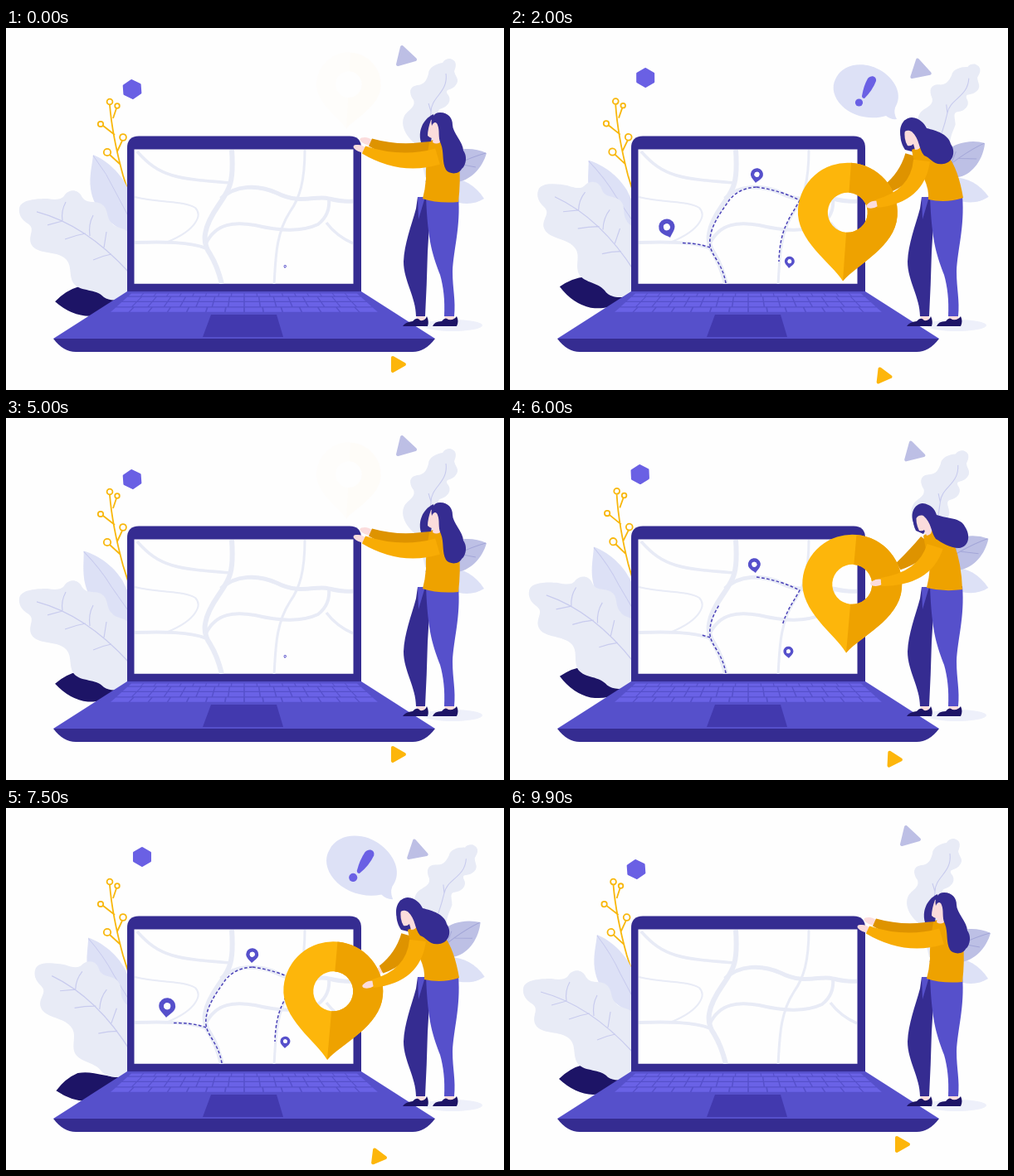
These frames come from a looping animation (600 by 437 pixels, 10000 ms). An HTML page with a canvas:

```html
<!DOCTYPE html>
<html lang="en">
<head>
<meta charset="utf-8">
<title>Placing a pin on a laptop map</title>
<style>
html, body { margin: 0; width: 600px; height: 437px; overflow: hidden; background: #fefefe }
canvas { display: block }
</style>
</head>
<body>
<canvas id="stage" width="600" height="437"></canvas>
<script>
const g = document.getElementById('stage').getContext('2d');
const NAVY = '#352c91', INK = '#1d1466', BLUE = '#5650cb', KEY = '#6a62e6', ROUTE = '#4a41b8',
  PALE = '#e8ebf6', LILAC = '#dde1f6', VEIN = '#c8cbee', GOLD = '#fdb60b', AMBER = '#eea200', SKIN = '#fbdcdc';

const fill = (d, color, rule) => { g.fillStyle = color; g.fill(new Path2D(d), rule); };
const line = (d, color, width) => {
  g.strokeStyle = color; g.lineWidth = width; g.stroke(new Path2D(d));
};
const disc = (x, y, r, color) => {
  g.fillStyle = color; g.beginPath(); g.arc(x, y, r, 0, 7); g.fill();
};
// Draws around the point (x, y), turned and scaled there.
const at = (x, y, deg, scale, draw) => {
  g.save(); g.translate(x, y); g.rotate(deg * Math.PI / 180); g.scale(scale, scale);
  draw(); g.restore();
};
const spin = (x, y, deg, draw, scale = 1) =>
  at(x, y, deg, scale, () => { g.translate(-x, -y); draw(); });

// Interpolates every number in two strings of the same form.
const NUM = /-?[\d.]+/g;
const mix = (a, b, k) => {
  const to = b.match(NUM);
  let i = 0;
  return a.replace(NUM, v => (+v + (to[i++] - v) * k).toFixed(3));
};
const track = (keys, t) => {
  const i = keys.findIndex(k => k[0] > t);
  if (i < 0) return keys[keys.length - 1][1];
  if (!i) return keys[0][1];
  const [t0, a] = keys[i - 1], [t1, b] = keys[i], u = (t - t0) / (t1 - t0);
  return mix(a, b, u * u * (3 - 2 * u));
};
const nums = (keys, t) => track(keys, t).split(' ').map(Number);

const ROADS = [
  ['M272 147C275 190 268 196 256 214C238 240 235 258 246 273Q255 288 260 309', 6],
  ['M158 149C185 180 205 182 271 187', 3.5],
  ['M155 204C190 212 213 208 228 217C237 226 229 244 195 258', 2],
  ['M155 259C190 258 222 258 241 266', 4],
  ['M259 206C276 189 304 189 326 199C355 214 375 201 389 206Q405 210 418 209', 5],
  ['M241 260C253 235 276 234 300 238C333 246 357 246 376 237Q391 225 389 206', 4],
  ['M360 147C360 185 354 205 342 222C324 250 325 282 323 309', 3],
  ['M386 235Q398 251 418 260', 3.5]
];
const TRUNK = 'M260 308C256 284 243 276 241 262C239 242 253 224 264 208Q276 193 297 192',
  WEST = 'M241 265Q222 258 193 260', EAST = 'M297 192Q326 196 349 208C337 230 325 242 324 282';

const POSE_TIMES = [0, .25, 1, 2, 2.5, 3.3, 4.1, 4.85];
const POSE_ORDER = [0, 0, 1, 2, 2, 3, 3, 0];
const posed = list => POSE_TIMES.map((t, i) => [t, list[POSE_ORDER[i]]]);
const HAIR = posed([
  'M513 118C511 108 516 102 523 102C533 102 538 109 538 117C538 126 551 138 551 148C557 156 553 168 549 170C546 177 534 177 530 171C525 162 528 150 524 140C520 132 523 124 520 117C518 112 515 114 513 118Z',
  'M486 126C482 115 487 104 497 103C507 104 512 110 514 117C528 122 543 120 548 131C556 143 552 156 541 157C529 157 520 150 513 146C507 138 508 126 498 118C491 116 489 122 486 126Z',
  'M471 131C468 120 473 109 484 108C494 109 499 115 502 121C514 124 528 128 531 140C538 150 533 163 522 164C510 166 506 156 499 154C492 146 494 134 484 125C476 121 474 127 471 131Z',
  'M469 132C466 121 470 110 481 109C491 110 496 116 499 122C511 125 525 130 528 141C534 150 531 164 522 166C511 168 506 159 498 156C490 150 491 136 481 126C474 123 472 128 469 132Z'
]);
const BACK_HAIR = posed([
  'M515 104C502 110 496 125 500 138L512 137L515 120Z', 'M490 107C484 114 484 126 489 136L498 140L505 128Z',
  'M476 111C469 119 468 136 476 147L488 150L492 136Z', 'M474 112C466 120 465 138 474 150L486 153L490 138Z'
]);
const FACE = posed([
  'M512 111Q508 122 508 130Q512 134 515 133L514 138Q520 142 525 136L523 108Z',
  'M490 116Q488 126 493 136Q497 137 499 135L502 142Q508 141 508 136L503 112Z',
  'M476 122Q474 134 479 142Q483 143 486 140L488 147Q494 147 495 142L490 118Z',
  'M474 124Q472 135 477 143Q481 144 484 141L486 149Q492 149 493 144L488 119Z'
]);
const TORSO = posed([
  'M510 138Q505 165 506 182Q505 195 502 206Q520 212 545 210Q548 185 546 165Q540 140 522 135Z',
  'M498 142Q502 165 506 180Q505 193 502 205Q522 210 545 207Q544 175 535 152Q520 138 508 136Z',
  'M484 147Q486 165 499 182Q505 195 504 207Q525 212 546 205Q540 170 528 155Q510 142 494 143Z',
  'M482 148Q485 170 498 190Q504 198 504 207Q525 212 546 204Q538 170 525 155Q505 143 491 144Z'
]);
// Arms: wrist, elbow, shoulder.
const FAR_ARM = posed([
  '439 138 478 155 517 145', '468 179 490 166 503 149', '452 195 478 182 486 154', '443 217 482 201 486 152'
]);
const NEAR_ARM = posed([
  '431 147 476 168 520 155', '447 198 500 194 512 155',
  '442 212 491 203 496 160', '463 231 494 207 495 160'
]);
// Big pin: tip, turn, scale, opacity.
const BIG_PIN = [
  [0, '410 122 3 .65 0.01'], [.35, '409 165 4 .9 1'], [1, '405 283.5 5 1 1'], [2, '401 305.5 4 1 1'],
  [2.5, '387 304 5 1 1'], [3.1, '380 302 4 .95 0']
];
// Map pins: x, y, size, then scale and turn over time.
const MAP_PINS = [
  [193, 253, 1 / 6, [[1.1, '0 0'], [1.7, '1 -24'], [2, '.97 -18'], [2.5, '1 5'], [3.2, '1 0'], [4.4, '1 0'], [4.8, '0 0']]],
  [296, 187, .125, [[.2, '0 0'], [.8, '1.05 -14'], [1, '1 -9'], [2, '1 8'], [3, '1 0'], [4.4, '1 0'], [4.8, '0 0']]],
  [336, 290, .1, [[0, '.28 5'], [.6, '1.1 10'], [1, '1 -4'], [2, '1 6'], [3, '1 0'], [4.3, '1 0'], [4.8, '0 0']]]
];
const BUBBLE = [
  [1, '0 -30'], [1.6, '.9 -4'], [2, '1 0'], [2.5, '1.1 5'], [3.5, '1.03 10'], [4.1, '1 6'], [4.7, '0 -25']
];
const REACH = [[0, '0 0 0'], [1, '92 12 102'], [2, '165 38 165'], [2.5, '165 44 165'], [3.2, '165 60 165']];

function pin(left, right) {
  const hole = 'M24 -83A24 24 0 1 0 -24 -83A24 24 0 1 0 24 -83Z';
  const body = 'M0 0C-15 -21 -60 -45 -60 -83A60 60 0 0 1 60 -83C60 -45 15 -21 0 0Z';
  fill(body + hole, left, 'evenodd');
  if (right) fill('M0 0V-59A24 24 0 0 0 0 -107V-143A60 60 0 0 1 60 -83C60 -45 15 -21 0 0Z', right);
  else fill(hole, '#fefefe');
}

function arm([wx, wy, ex, ey, sx, sy], color) {
  const dir = Math.atan2(wy - ey, wx - ex), up = Math.atan2(ey - sy, ex - sx);
  const side = (x, y, a, r) => `${x - Math.sin(a) * r} ${y + Math.cos(a) * r}`;
  const mid = (dir + up) / 2 + (Math.abs(dir - up) > Math.PI ? Math.PI : 0);
  at(wx, wy, dir * 180 / Math.PI, 1, () =>
    fill('M-2 -3Q6 -6 12 -3Q15 0 10 2Q5 5 -2 3Z', SKIN));
  fill(`M${side(wx, wy, dir, 5)}Q${side(ex, ey, mid, 11)} ${side(sx, sy, up, 10)}` +
    `L${side(sx, sy, up, -10)}Q${side(ex, ey, mid, -11)} ${side(wx, wy, dir, -5)}Z`, color);
}

function route(d, length) {
  const dashes = Array(Math.floor(length / 6)).fill([3.6, 2.4]).flat();
  if (!dashes.length) return;
  g.setLineDash([...dashes, 0, 999]);
  line(d, ROUTE, 1.5);
  g.setLineDash([]);
}

function plants(t, sway) {
  const a = 2 * Math.PI * t * .3, s = Math.sin(a), c = Math.cos(a);
  spin(150, 325, 1 - 10 * s - 3 * c, () =>
    fill('M150 325C120 322 110 310 88 310Q72 314 59 327Q78 345 100 346C125 345 130 335 150 325Z', INK));
  spin(160, 260, 1.3 * Math.sin(2 * Math.PI * t / 5), () => {
    line('M125 93Q128 130 141 178L148 200M129 109L133 97M131 129L117 118M134 149L140 136M138 165L125 153', '#f8b70c', 1.8);
    for (const [x, y, r] of [[125, 89, 3.4], [134, 94, 2.8], [114, 116, 3.2], [141, 132, 3.9], [122, 150, 4.2]]) {
      disc(x, y, r + .9, '#f8b70c');
      disc(x, y, r - .9, '#fefefe');
    }
  });
  spin(160, 250, 3.5 * (c - 1), () => {
    fill('M105 153C122 160 139 176 147 194L168 255C130 246 105 220 102 194C100 178 104 165 105 153Z', LILAC);
    line('M105 154Q122 176 133 200L152 236', VEIN, 1);
  });
  spin(150, 310, 10.7 * sway, () => {
    fill('M16 218C17 207 38 206 50 206C61 208 68 207 71 201C77 194 87 195 91 203C96 213 107 208 114 212C124 217 120 228 127 235C133 244 145 238 155 255L180 300L146 322C139 330 125 330 118 325C108 314 91 319 82 309C74 298 82 284 68 276C56 269 38 273 31 262C25 251 37 243 26 236C18 231 15 224 16 218Z', PALE);
    line('M37 222C82 234 118 262 148 295M68 233Q66 221 72 210M101 251Q99 237 105 226M118 265L121 246M71 255Q84 250 96 248M50 238L68 233M105 280Q116 275 127 273', VEIN, 1.2);
  });
  spin(510, 185, 11 * sway, () => {
    fill('M535 37C543 39 543 45 540 52C541 59 548 62 541 70C536 76 528 73 532 80C538 87 532 95 525 97C517 99 523 106 524 113C523 121 520 127 522 137L520 180H505L496 142C483 133 474 118 480 106C484 99 494 96 491 87C484 77 487 70 496 69C505 68 507 62 509 55C509 48 518 43 526 42C528 38 532 37 535 37Z', PALE);
    line('M530 55C533 78 512 83 512 101Q511 125 506 142M512 101L509 91', VEIN, 1.1);
  });
  spin(510, 185, -2 * sway, () =>
    fill('M510 186C535 176 560 181 576 206C560 216 540 214 510 195Z', LILAC));
  spin(505, 185, -10.5 * sway, () => {
    fill('M505 186C516 160 535 145 556 146Q568 146 579 151C574 169 559 185 542 186Z', '#bdc0e5');
    line('M510 183C532 169 553 158 578 151M534 170L543 155M545 164L566 168', '#a3a6d8', 1);
  });
}

function shapes(sway) {
  g.lineJoin = 'round';
  const chip = (x, y, deg, d, color, w) => at(x, y, deg, 1, () => { fill(d, color); line(d, color, w); });
  chip(152 + 12 * sway, 74 - 15 * sway, 4 * sway - 4, 'M0 -10.5L9.5 -5V5L0 10.5L-9.5 5V-5Z', '#6a60e4', 3);
  chip(481 + 14 * sway, 35 + 17 * sway, 5 * sway, 'M-4 -12L12 3L-9 9Z', '#bdbfe5', 4);
  chip(471 - 23 * sway, 406 + 15 * sway, 7 * sway, 'M-5 -8L9 0L-5 8Z', GOLD, 4);
}

function laptop() {
  fill('M146 321V145Q146 130.5 160 130.5H414Q428 130.5 428 145V321Z', NAVY);
  fill('M154.5 146.5H418.5V308.7H154.5Z', '#fefefe');
  fill('M146 318H428L517 375H57Z', BLUE);
  fill('M57 375H517Q505 391 490 391H84Q69 391 57 375Z', NAVY);
  const edge = (y, u) => {
    const inset = (y - 320) * 1.13;
    return 151 - inset + u * (272 + 2 * inset);
  };
  [[320.5, 323.5, 18], [324.8, 329.8, 16], [331, 336.2, 16], [337.4, 342.8, 14]].forEach(([y0, y1, n]) => {
    for (let i = 0; i < n; i++) {
      const a = (i + .04) / n, b = (i + .96) / n;
      fill(`M${edge(y0, a)} ${y0}H${edge(y0, b)}L${edge(y1, b)} ${y1}H${edge(y1, a)}Z`, KEY);
    }
  });
  fill('M247 346H326L334 373H237Z', '#4239ae');
}

function map(t) {
  g.save();
  g.beginPath(); g.rect(155, 147, 263, 162); g.clip();
  for (const [d, w] of ROADS) line(d, PALE, w);
  const [trunk, west, east] = nums(REACH, t);
  g.globalAlpha = +track([[4.3, '1'], [4.8, '0']], t);
  route(TRUNK, trunk); route(WEST, west); route(EAST, east);
  g.restore();
  for (const [x, y, size, keys] of MAP_PINS) {
    const [scale, turn] = nums(keys, t);
    if (scale > 0) at(x, y, turn, scale * size, () => pin(BLUE));
  }
}

function bubble(t) {
  const [scale, turn] = nums(BUBBLE, t);
  if (scale <= 0) return;
  spin(464, 110, turn, () => {
    fill('M392 62C400 42 428 39 448 52C466 64 473 82 464 96Q462 103 466 110Q459 111 453 106C434 112 412 106 400 94C390 84 387 72 392 62Z', LILAC);
    fill('M431 61C435 56 442 58 441 64Q437 75 427 85Q424 85 424 82Q426 70 431 61Z', '#6a60e4');
    disc(420.5, 90, 4.6, '#6a60e4');
  }, scale);
}

function woman(t) {
  g.fillStyle = '#eef0fa';
  g.beginPath(); g.ellipse(538, 359, 36, 7, 0, 0, 7); g.fill();
  fill('M494 343H504L505 354H495ZM528 343H539L541 354H529Z', SKIN);
  fill('M478 360Q481 355 490 354Q495 348 499 353Q505 354 507 348Q510 354 508 360ZM514 360Q516 354 525 354Q529 348 533 352Q540 353 543 348Q546 354 543 360Z', INK);
  fill('M496 204H512L508 270Q507 310 505 348H494C494 325 479 305 479 282C480 260 488 240 494 218Z', NAVY);
  fill('M496 204H505L497 231Z', BLUE);
  fill('M506 203H545C548 240 539 268 538 294C538 315 542 328 540 348H528C529 328 527 312 523 298C515 276 508 260 506 203Z', BLUE);

  arm(nums(FAR_ARM, t), '#de9300');
  const [x, y, turn, scale, alpha] = nums(BIG_PIN, t);
  g.globalAlpha = alpha;
  at(x, y, turn, scale, () => pin(GOLD, AMBER));
  g.globalAlpha = 1;
  fill(track(BACK_HAIR, t), NAVY);
  fill(track(TORSO, t), AMBER);
  arm(nums(NEAR_ARM, t), '#f8ac05');
  fill(track(FACE, t), SKIN);
  fill(track(HAIR, t), NAVY);
}

function draw(now) {
  const time = Math.floor(now / 100) / 10 % 10, t = time % 5;
  const sway = (1 - Math.cos(2 * Math.PI * (t + .08) / 5)) / 2;
  g.fillStyle = '#fefefe';
  g.fillRect(0, 0, 600, 437);
  plants(time, sway);
  shapes(sway);
  laptop();
  map(t);
  bubble(t);
  woman(t);
  requestAnimationFrame(draw);
}
requestAnimationFrame(draw);
</script>
</body>
</html>
```
